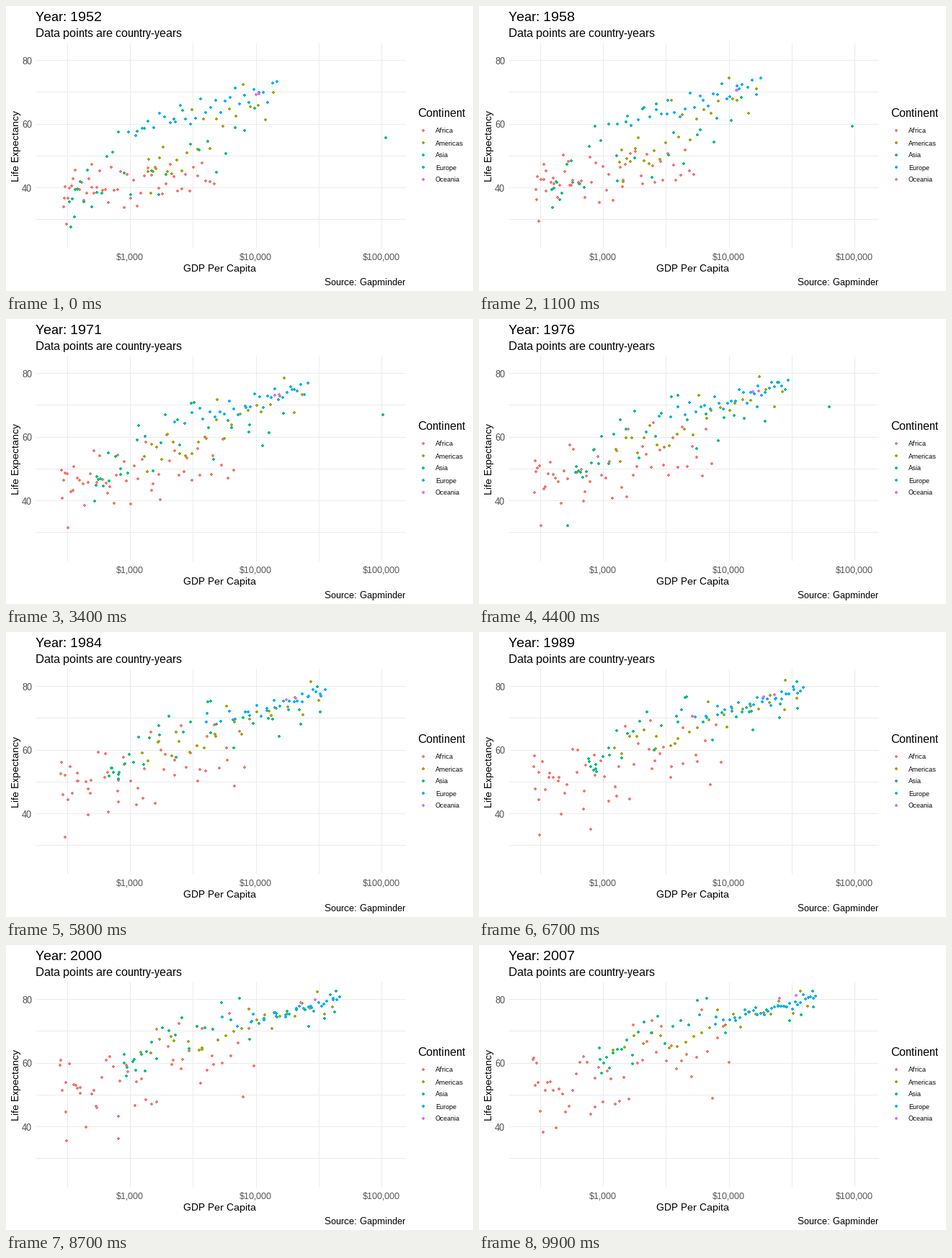
Animation, 648 px wide and 396 px high, one loop 10 s. Source, as a matplotlib script:

```python
import numpy as np
import matplotlib.pyplot as plt
from matplotlib.animation import FuncAnimation

W, H, DPI = 648, 396, 72
FRAMES, INTERVAL = 100, 100
START, END = 1952, 2007
STEPS = np.linspace(START, END, 12)
COLORS = {"Africa": "#F8766D", "Americas": "#A3A500", "Asia": "#00BF7D",
          "Europe": "#00B0F6", "Oceania": "#E76BF3"}
GRID, TICK = "#EBEBEB", "#4D4D4D"

plt.rcParams.update({"font.family": "Liberation Sans",
                     "text.hinting": "native", "text.hinting_factor": 1})

# Countries, then the first and last year as: poorest and richest (log10 GDP),
# skew of incomes, life expectancy of poorest and richest, spread
REGIONS = {
    "Africa": (51, (2.47, 3.67, 1.4, 36.5, 44, 4.5), (2.44, 4.0, 1.4, 47, 64, 7.5)),
    "Americas": (25, (3.14, 4.14, 1.5, 46, 67, 5), (3.08, 4.63, 0.9, 65, 80, 2.2)),
    "Asia": (31, (2.52, 3.99, 1.6, 38, 57, 6.5), (2.97, 4.67, 1.7, 61, 80, 3.5)),
    "Europe": (30, (2.99, 4.17, 0.9, 57, 72, 2.2), (3.77, 4.69, 0.6, 73, 80.7, 1.1)),
}

# Countries far from the crowd: year, GDP, life expectancy
TRACKS = [
    ("Asia", [(1952, 108382, 55.6), (1967, 80895, 64.6), (1972, 109348, 67.7),
              (1982, 31354, 71.3), (2007, 47307, 77.6)]),
    ("Asia", [(1952, 368, 39.4), (1967, 523, 45.4), (1977, 525, 31.2),
              (1982, 624, 51), (2007, 1714, 59.7)]),
    ("Africa", [(1952, 493, 40), (1987, 848, 44), (1992, 737, 23.6),
                (2007, 863, 46.2)]),
    ("Oceania", [(1952, 10040, 69.1), (2007, 34435, 81.2)]),
    ("Oceania", [(1952, 10557, 69.4), (2007, 25185, 80.2)]),
]


def px(log_gdp):
    return 172.2 + 174.4 * (log_gdp - 3)


def py(life):
    return 252 - 4.42 * (life - 40)


def crowd(rng, n, first, last):
    """Paths of n countries that slowly trade places within their region."""
    t = (STEPS - START) / (END - START)
    ease = 1 - (1 - t) ** 1.5
    poor, rich, skew, low, high, spread = (a + (b - a) * ease
                                           for a, b in zip(first, last))
    order = np.linspace(0, 1, n)[:, None] + rng.normal(0, 0.025, (n, 12)).cumsum(1)
    rank = order.argsort(0).argsort(0) / (n - 1)
    dev = rng.normal(size=(2, n, 1))
    dev = np.clip(dev[0] * np.cos(t) + dev[1] * np.sin(t), -1.9, 1.9)
    x = poor + (rich - poor) * rank ** skew
    y = low + (high - low) * rank + spread * dev
    return np.stack([x, np.minimum(y, 82.6)], axis=1)


def track(keys):
    year, gdp, life = np.array(keys).T
    return np.stack([np.interp(STEPS, year, np.log10(gdp)),
                     np.interp(STEPS, year, life)])


rng = np.random.default_rng(7)
paths, colors = [], []
for name, (n, first, last) in REGIONS.items():
    paths.extend(crowd(rng, n, first, last))
    colors += [COLORS[name]] * n
for name, keys in TRACKS:
    paths.append(track(keys))
    colors.append(COLORS[name])
paths = np.array(paths)

fig = plt.figure(figsize=(W / DPI, H / DPI), dpi=DPI, facecolor="white")
ax = fig.add_axes([0, 0, 1, 1])
ax.set(xlim=(0, W), ylim=(H, 0))
ax.axis("off")


def label(x, y, text, size, color="black", **kw):
    return ax.text(x, y, text, size=size, color=color, va="baseline", **kw)


def dots(x, y, c):
    # Without antialiasing every touched pixel fills: a round dot 4 px wide
    return ax.scatter(x, y, s=7, c=c, linewidths=0, antialiased=False, zorder=3)


ax.hlines([py(v) for v in range(30, 90, 10)], 41, 554, color=GRID, lw=1)
ax.vlines([px(v) for v in np.arange(2.5, 5.5, 0.5)], 51, 335.5, color=GRID, lw=1)
for v in (40, 60, 80):
    label(36, py(v) + 5.8, str(v), 12.5, TICK, ha="right")
for e in (3, 4, 5):
    label(px(e), 353, f"${10 ** e:,}", 12, TICK, ha="center")

title = label(41, 21, "", 19.2)
label(41, 43, "Data points are country-years", 15.6)
label(297, 369, "GDP Per Capita", 14, ha="center")
label(18, 194, "Life Expectancy", 14, ha="center",
      rotation=90, rotation_mode="anchor")
label(554, 388, "Source: Gapminder", 12.8, ha="right")

label(571, 154, "Continent", 15.6)
rows = np.round(172.6 + 17.2 * np.arange(len(COLORS)))
dots([579] * len(rows), rows, list(COLORS.values()))
for name, y in zip(COLORS, rows):
    label(596, y + 3.5, name, 9.4)

points = dots(np.zeros(len(colors)), np.zeros(len(colors)), colors)


def draw(frame):
    pos = frame / (FRAMES - 1) * (len(STEPS) - 1)
    k = min(int(pos), len(STEPS) - 2)
    f = pos - k
    x, y = ((1 - f) * paths[:, :, k] + f * paths[:, :, k + 1]).T
    points.set_offsets(np.round(np.column_stack([px(x), py(y)])))
    title.set_text(f"Year: {round(START + 5 * pos)}")
    return points, title


anim = FuncAnimation(fig, draw, frames=FRAMES, interval=INTERVAL,
                     repeat=True, repeat_delay=0)
plt.show()
```
